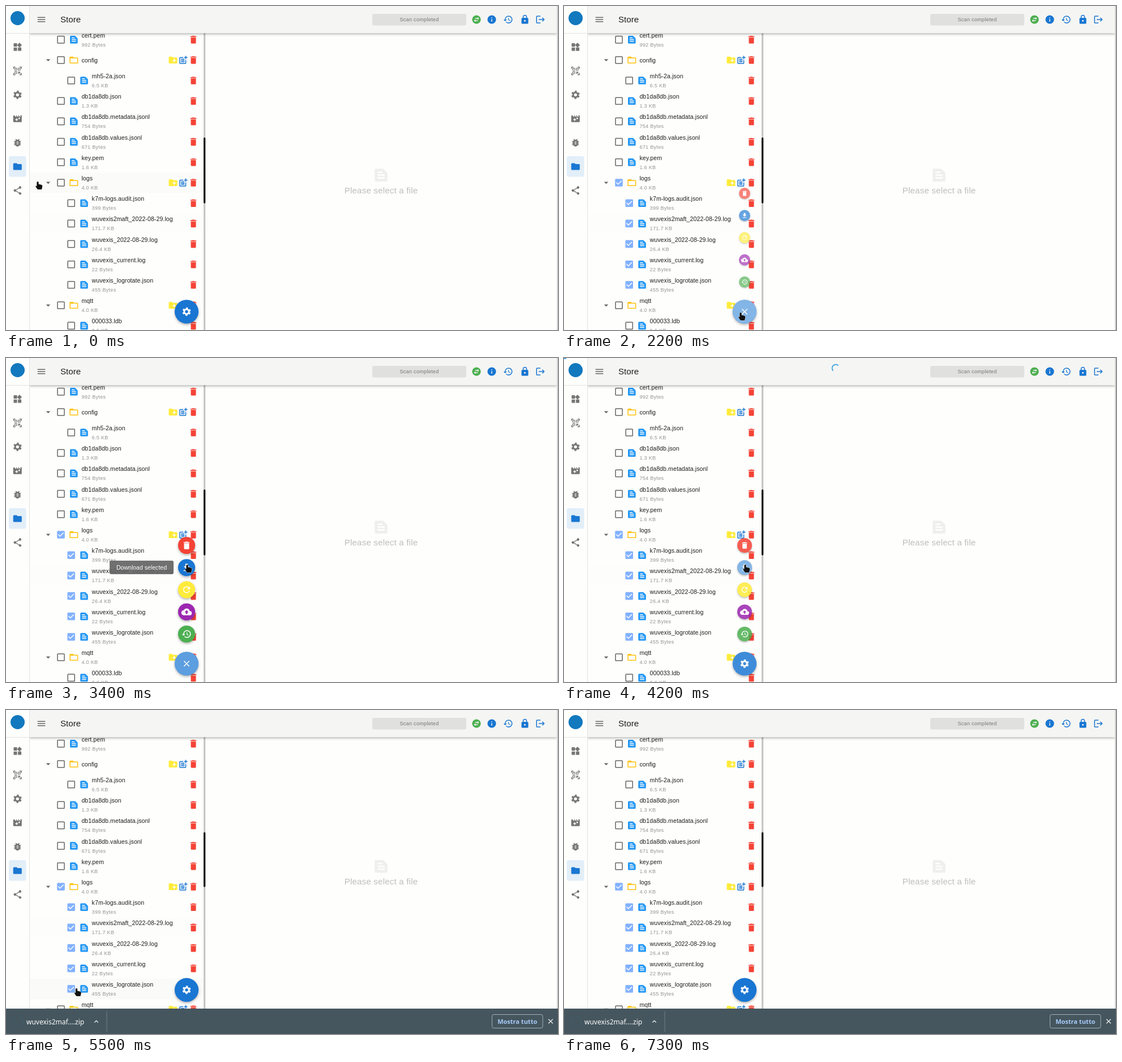
An HTML page that plays this animation: 975 px wide and 574 px high, repeating every 7.7 s.

```html
<!DOCTYPE html>
<html lang="en">
<head>
<meta charset="utf-8">
<title>Store</title>
<style>
html, body { margin: 0; height: 100%; overflow: hidden; background: #fefefd }
svg { display: block; width: 975px; height: 574px }
text { font: 10.56px "Liberation Sans", Arial, sans-serif; letter-spacing: .09px; fill: #1e1e1e }
.small { font-size: 9.05px; letter-spacing: .3px; fill: #949494 }
.title { font-size: 15.08px; letter-spacing: 0 }
.empty { font-size: 15.08px; letter-spacing: .19px; fill: #bdbdbd }
.tip { fill: #fff; letter-spacing: 0 }
.shelf { font: 12px "Noto Sans", sans-serif; letter-spacing: 0; fill: #fff }
.all { font: 600 11px "Noto Sans", sans-serif; letter-spacing: 0; fill: #a9cbfa }
.bar { filter: drop-shadow(0 2px 2px rgba(0,0,0,.28)) }
.raised { filter: drop-shadow(0 2px 2px rgba(0,0,0,.3)) }
</style>
</head>
<body>
<svg id="stage" viewBox="0 0 975 574"></svg>
<script>
const LOOP = 7700, STEP = 100, ROW = 36.2, SCALE = .754;
const BLUE = '#1976d2', GRAY = '#757575', RED = '#f44336', YELLOW = '#ffeb3b';

const paths = {
  menu: 'M3 6h18v2H3zM3 11h18v2H3zM3 16h18v2H3z',
  widgets: 'M13 13v8h8v-8zM3 21h8v-8H3zM3 3v8h8V3zM16.66 1.69L11 7.34 16.66 13l5.66-5.66z',
  scan: 'M5 5h6v6H5zm1.5 1.5v3h3v-3zM5 13h6v6H5zm1.5 1.5v3h3v-3zM13 5h6v6h-6zm1.5 1.5v3h3v-3zM13 13h1.5v1.5H16V13h1.5v1.5H19V16h-1.5v1.5H19V19h-1.5v-1.5H16V19h-1.5v-1.5H13V16h1.5v-1.5H13zM22 7h-2V4h-3V2h5zM22 22v-5h-2v3h-3v2zM2 22h5v-2H4v-3H2zM2 2v5h2V4h3V2z',
  scenes: 'M18 4l2 3h-3l-2-3h-2l2 3h-3l-2-3H8l2 3H7L5 4H4a2 2 0 0 0-2 2v12a2 2 0 0 0 2 2h16a2 2 0 0 0 2-2V4zM11.25 15.25L10 18l-1.25-2.75L6 14l2.75-1.25L10 10l1.25 2.75L14 14zM16.94 11.94L16 14l-.94-2.06L13 11l2.06-.94L16 8l.94 2.06L19 11z',
  bug: 'M20 8h-2.8a6 6 0 0 0-1.8-2L17 4.4 15.6 3l-2.2 2.2a6 6 0 0 0-2.8 0L8.4 3 7 4.4 8.6 6a6 6 0 0 0-1.8 2H4v2h2.1L6 12H4v2h2l.1 2H4v2h2.8a6 6 0 0 0 10.4 0H20v-2h-2.1l.1-2h2v-2h-2l-.1-2H20zM14 16h-4v-2h4zM14 12h-4v-2h4z',
  folder: 'M10 4H4a2 2 0 0 0-2 2v12a2 2 0 0 0 2 2h16a2 2 0 0 0 2-2V8a2 2 0 0 0-2-2h-8z',
  share: 'M6 9a3 3 0 1 0 2 5.2l7.1 4.1a3 3 0 1 0 .9-1.5l-7.1-4.1v-1.4L16 7.2a3 3 0 1 0-.9-1.5L8 9.8A3 3 0 0 0 6 9z',
  swap: 'M12 2a10 10 0 1 0 .01 0zM9 8.5h5.5v-2l3.5 3-3.5 3v-2H9zM15 13.5H9.5v-2L6 14.5l3.5 3v-2H15z',
  info: 'M12 2a10 10 0 1 0 .01 0zM13 17h-2v-6h2zM13 9h-2V7h2z',
  history: 'M13 3a9 9 0 0 0-9 9H1l4 4 4-4H6a7 7 0 1 1 2 4.9l-1.4 1.5A9 9 0 1 0 13 3zM12 8v5l4.3 2.5.7-1.2-3.5-2.1V8z',
  lock: 'M18 8h-1V6A5 5 0 0 0 7 6v2H6a2 2 0 0 0-2 2v10a2 2 0 0 0 2 2h12a2 2 0 0 0 2-2V10a2 2 0 0 0-2-2zM12 17a2 2 0 1 1 .01 0zM15.1 8H8.9V6a3.1 3.1 0 0 1 6.2 0z',
  logout: 'M17 7l-1.4 1.4 2.6 2.6H8v2h10.2l-2.6 2.6L17 17l5-5zM4 5h8V3H4a2 2 0 0 0-2 2v14a2 2 0 0 0 2 2h8v-2H4z',
  file: 'M20.4 8.4l-4.8-4.8A2 2 0 0 0 14.2 3H5a2 2 0 0 0-2 2v14a2 2 0 0 0 2 2h14a2 2 0 0 0 2-2V9.8a2 2 0 0 0-.6-1.4zM7 7h7v2H7zM17 17H7v-2h10zM17 13H7v-2h10z',
  addFile: 'M17 19H5V7h7V5H5a2 2 0 0 0-2 2v12a2 2 0 0 0 2 2h12a2 2 0 0 0 2-2v-7h-2zM19 2h-2v3h-3v2h3v3h2V7h3V5h-3zM7 9h8v2H7zM7 12h8v2H7zM7 15h8v2H7z',
  trash: 'M6 19a2 2 0 0 0 2 2h8a2 2 0 0 0 2-2V7H6zM19 4h-3.5l-1-1h-5l-1 1H5v2h14z',
  download: 'M5 20h14v-2H5zM19 9h-4V3H9v6H5l7 7z',
  refresh: 'M17.65 6.35A8 8 0 1 0 19.7 14h-2.1A6 6 0 1 1 16.2 7.8L13 11h7V4z',
  upload: 'M19.35 10A7.5 7.5 0 0 0 5.35 8 6 6 0 0 0 6 20h13a5 5 0 0 0 .35-10zM14 13v4h-4v-4H7l5-5 5 5z',
  close: 'M19 6.4L17.6 5 12 10.6 6.4 5 5 6.4l5.6 5.6L5 17.6 6.4 19l5.6-5.6 5.6 5.6 1.4-1.4-5.6-5.6z',
  caret: 'M7 10l5 5 5-5z',
  up: 'M12 8l-6 6 1.4 1.4 4.6-4.6 4.6 4.6L18 14z',
  box: 'M5 3h14a2 2 0 0 1 2 2v14a2 2 0 0 1-2 2H5a2 2 0 0 1-2-2V5a2 2 0 0 1 2-2z'
};
paths.folderOpen = paths.folder + 'M4 8h16v10H4z';
paths.addFolder = paths.folder + 'M19 14h-3v3h-2v-3h-3v-2h3V9h2v3h3z';
paths.unchecked = paths.box + 'M5 5h14v14H5z';
paths.checked = paths.box + 'M10 17l-5-5 1.4-1.4 3.6 3.6 7.6-7.6L19 8z';

const gear = color => `<g transform="translate(12 12)" fill="none" stroke="${color}">
  <circle r="5.5" stroke-width="4"/>
  <circle r="8.4" stroke-width="3" pathLength="12" stroke-dasharray="1 1" stroke-dashoffset="-.5"/></g>`;

function icon(name, x, y, color, scale = SCALE) {
  const shape = name === 'gear' ? gear(color)
    : `<path d="${paths[name]}" fill="${color}" fill-rule="evenodd"/>`;
  return `<g transform="translate(${x} ${y}) scale(${scale}) translate(-12 -12)">${shape}</g>`;
}
const rect = (x, y, w, h, fill, more = '') =>
  `<rect x="${x}" y="${y}" width="${w}" height="${h}" fill="${fill}" ${more}/>`;
const circle = (x, y, r, fill, more = '') =>
  `<circle cx="${x}" cy="${y}" r="${r}" fill="${fill}" ${more}/>`;
const label = (x, y, str, cls = '', more = '') =>
  `<text x="${x}" y="${y}" class="${cls}" ${more}>${str}</text>`;

// Linear interpolation through [time, ...values] keys.
function track(t, keys) {
  if (t <= keys[0][0]) return keys[0].slice(1);
  const n = keys.findIndex(k => k[0] >= t);
  if (n < 0) return keys[keys.length - 1].slice(1);
  const a = keys[n - 1], b = keys[n], p = (t - a[0]) / (b[0] - a[0]);
  return a.slice(1).map((v, i) => v + (b[i + 1] - v) * p);
}
const value = (t, ...keys) => track(t, keys)[0];

// [depth, name, size, is folder]
const rows = [
  [0, 'cert.pem', '992 Bytes'], [0, 'config', '', 1], [1, 'mh5-2a.json', '6.5 KB'],
  [0, 'db1da8db.json', '1.3 KB'], [0, 'db1da8db.metadata.jsonl', '754 Bytes'],
  [0, 'db1da8db.values.jsonl', '671 Bytes'], [0, 'key.pem', '1.6 KB'],
  [0, 'logs', '4.0 KB', 1], [1, 'k7m-logs.audit.json', '399 Bytes'],
  [1, 'wuvexis2maft_2022-08-29.log', '171.7 KB'], [1, 'wuvexis_2022-08-29.log', '26.4 KB'],
  [1, 'wuvexis_current.log', '22 Bytes'], [1, 'wuvexis_logrotate.json', '455 Bytes'],
  [0, 'mqtt', '4.0 KB', 1], [1, '000033.ldb', '6.6 KB']
];
const rowY = i => 59.6 + ROW * i;

function tree(t) {
  const hover = {
    7: value(t, [0, .4], [900, .4], [1100, 0]),
    9: value(t, [4200, .1], [4500, 1], [4900, 1], [5500, .12], [5700, 0]),
    12: value(t, [5300, 0], [5500, .45], [5600, 0])
  };
  const ripple = value(t, [800, 0], [900, .15], [1000, .25], [1700, 0]);
  return rows.map(([depth, name, size, folder], i) => {
    const y = rowY(i), x = 97 + depth * 18.2, on = t >= 900 && i > 6 && i < 13;
    return (hover[i] ? rect(41, y - 18, 308, ROW, '#f4f4f4', `opacity="${hover[i]}"`) : '')
      + (i === 7 ? circle(x, y, 10, '#82b1ff', `opacity="${ripple}"`) : '')
      + (folder ? icon('caret', 74.5, y, '#666') : '')
      + icon(on ? 'checked' : 'unchecked', x, y, on ? '#82b1ff' : '#666')
      + icon(folder ? 'folderOpen' : 'file', x + 22.8, y, folder ? '#ffc107' : '#2196f3')
      + label(x + 36.4, y + (size ? -4 : 4), name)
      + label(x + 36.4, y + 12, size, 'small')
      + (folder ? icon('addFolder', 295, y, YELLOW) + icon('addFile', 313, y, BLUE) : '')
      + icon('trash', 331, y, RED);
  }).join('');
}

function frameUi() {
  const nav = ['widgets', 'scan', 'gear', 'scenes', 'bug', 'folder', 'share'];
  const tools = [['swap', 831, '#4caf50'], ['info', 858, BLUE], ['history', 887, BLUE],
    ['lock', 916.5, BLUE], ['logout', 944, BLUE]];
  return rect(41, 0, 932, 48, '#f5f5f3', 'class="bar"')
    + rect(0, 0, 41, 574, '#fefefd') + rect(41, 0, 1, 574, '#e2e2e0') + rect(0, 48, 41, 1, '#e2e2e0')
    + rect(973, 0, 2, 574, '#cfcfcf')
    + circle(20.5, 21.5, 12.5, '#1279be')
    + rect(5, 266, 30.5, 36.5, '#e2eef8', 'rx="3"')
    + nav.map((n, i) => icon(n, 20.3, 72.7 + 42.35 * i, i === 5 ? BLUE : GRAY)).join('')
    + icon('menu', 62.5, 24, '#666') + label(96, 29.3, 'Store', 'title')
    + rect(647, 14, 166, 20.5, '#e0e0de', 'rx="3"')
    + label(730, 27.2, 'Scan completed', 'small', 'text-anchor="middle" style="fill:#757575"')
    + tools.map(([n, x, c]) => icon(n, x, 24, c)).join('');
}

function speedDial(t, fabY) {
  const size = value(t, [2000, 0], [2100, .33], [2200, .66], [2300, 1], [4100, 1], [4200, .86], [4300, .35], [4400, 0]);
  const glow = value(t, [1400, 0], [1600, .08], [2000, .15], [2200, .46], [2400, .4], [2600, .29], [4100, .29], [4200, .16], [4400, 0]);
  const actions = [['trash', RED], ['download', BLUE], ['refresh', YELLOW], ['upload', '#9c27b0'], ['history', '#4caf50']];
  const minis = actions.map(([name, color], i) =>
    `<g transform="translate(319 ${332 + 39.25 * i}) scale(${size})" opacity="${size}">`
    + circle(0, 0, 15.1, color, 'class="raised"')
    + (i === 1 && t >= 4100 ? circle(0, 0, 15.1, '#fff', 'opacity=".38"') : '')
    + icon(name, 0, 0, '#fff') + '</g>').join('');
  return circle(319, fabY, 21.1, BLUE, 'class="raised"')
    + circle(319, fabY, 21.1, '#fff', `opacity="${glow}"`)
    + icon(t >= 2100 && t < 4200 ? 'close' : 'gear', 319, fabY, '#fff')
    + (size ? minis : '');
}

function tooltip(str, x, y, w, h, alpha) {
  return alpha ? `<g opacity="${alpha}">` + rect(x - w / 2, y - h / 2, w, h, '#616161', 'rx="3"')
    + label(x, y + 3.7, str, 'tip', 'text-anchor="middle"') + '</g>' : '';
}
const tooltips = t =>
  tooltip('Restore', 266.5, 489, 59, 22, value(t, [2400, 0], [2600, .3], [2800, .06], [2900, 0]))
  + tooltip('Backup', 266.5, 449.5, 53, 21, value(t, [2500, 0], [2700, .4], [2800, .23], [3000, 0]))
  + tooltip('Download selected', 239.5, 371, 113, 24, value(t, [2900, 0], [3200, .8], [3400, .9], [4000, .9], [4100, .4], [4200, 0]));

function loading(t) {
  if (t < 4200 || t > 5100) return '';
  const width = value(t, [4200, 4], [4500, 500], [4800, 975]);
  const alpha = value(t, [4800, 1], [5100, 0]);
  return `<g opacity="${alpha}">` + rect(0, 0, width, 1.6, '#29d')
    + `<path d="M-4.6 4.6A6.5 6.5 0 0 1 4.6-4.6" fill="none" stroke="#29d" stroke-width="1.5"
        transform="translate(480 18) rotate(${(t - 4200) * .9})"/></g>`;
}

function shelf(t) {
  if (t < 4600) return '';
  const top = value(t, [4500, 45], [4800, 0]);
  const edge = value(t, [4700, 0], [4800, 44], [5000, 178]);
  const p = (t - 4900) / 2500, ring = p < 0 ? 1 : p > 1 ? 0 : .5 + .5 * Math.cos(5 * Math.PI * p);
  return `<g transform="translate(0 ${top})">` + rect(0, 529, 975, 45, '#45565e')
    + (edge ? rect(edge - .5, 534, 1, 36, '#728088') + icon('up', edge - 18.5, 552, '#fff', .62) : '')
    + (edge > 170 ? label(36, 556.5, 'wuvexis2maf….zip', 'shelf') : '')
    + circle(20.8, 551.8, 9.7, 'none', `stroke="#2493f2" stroke-width="1.4" opacity="${ring}"`)
    + rect(858.5, 539.5, 89.5, 24, 'none', 'rx="3" stroke="#a3b1ba"')
    + label(903.2, 555.5, 'Mostra tutto', 'all', 'text-anchor="middle"')
    + icon('close', 962, 551.5, '#fff', .6) + '</g>';
}

function fallingArrow(t) {
  const p = (t - 4500) / 600;
  if (p <= 0 || p >= 1) return '';
  return `<path transform="translate(26.3 ${498 + 40 * (p - .5)})" opacity="${Math.sin(Math.PI * p)}"
    d="M-2.7-8h5.4v7H8L0 7.5-8-1h5.3zM-11.5 18h23v2h-23z" fill="#f0aa8e"/>`;
}

function cursor(t) {
  if (t >= 7200) return '';
  const [x, y] = track(t, [[200, 56, 311], [300, 74, 315], [400, 108, 319], [500, 122, 318], [600, 98, 314],
    [1000, 98, 314], [1200, 190, 400], [1500, 312, 543], [2400, 312, 543], [2500, 316, 490], [2600, 318, 450],
    [2700, 321, 410], [2800, 322.5, 391], [3000, 320, 366], [4200, 320, 366], [4500, 319, 370], [4900, 319, 370],
    [5100, 285, 390], [5400, 150, 468], [5500, 124.5, 493], [5600, 150, 545], [5800, 228, 556], [6000, 234, 556],
    [6400, 207, 546], [6600, 205, 500], [6900, 203, 200], [7100, 200, 28]]);
  const arrow = t === 2800 || t >= 5600 || (t >= 1100 && t <= 1300);
  const d = arrow ? 'M0 0v12l2.8-2.6 2 4.6 2-1-2-4.4h4z'
    : 'M-1.6 1.5Q-1.6 0 0 0t1.6 1.5V4.6l4.8 1.1q2 .4 1.9 2.3l-.4 2.6q-.2 1.3-.7 2V14H0l-3.4-4.4q-.9-1.6.4-2 .7 0 1.4.8z';
  return `<path d="${d}" transform="translate(${x} ${y})" fill="#111" stroke="#fff" stroke-width=".7" paint-order="stroke"/>`;
}

function draw(t) {
  const short = t >= 4900;
  const midY = short ? 277 : 299.6;
  return tree(t)
    + rect(349, 48, 3.2, 526, '#c6c6c6')
    + (short ? rect(349, 216.5, 3.2, 97, '#000', 'rx="1.5"') : rect(349, 233, 3.2, 116.5, '#000', 'rx="1.5"'))
    + icon('file', 662.5, midY, '#efefed', 1.257)
    + label(662.5, midY + 32.3, 'Please select a file', 'empty', 'text-anchor="middle"')
    + frameUi() + speedDial(t, short ? 495.9 : 541.5) + tooltips(t)
    + fallingArrow(t) + shelf(t) + loading(t) + cursor(t);
}

const stage = document.getElementById('stage');
let shown = -1;
function tick() {
  const t = Math.floor(performance.now() % LOOP / STEP) * STEP;
  if (t !== shown) stage.innerHTML = draw(shown = t);
  requestAnimationFrame(tick);
}
tick();
</script>
</body>
</html>
```
